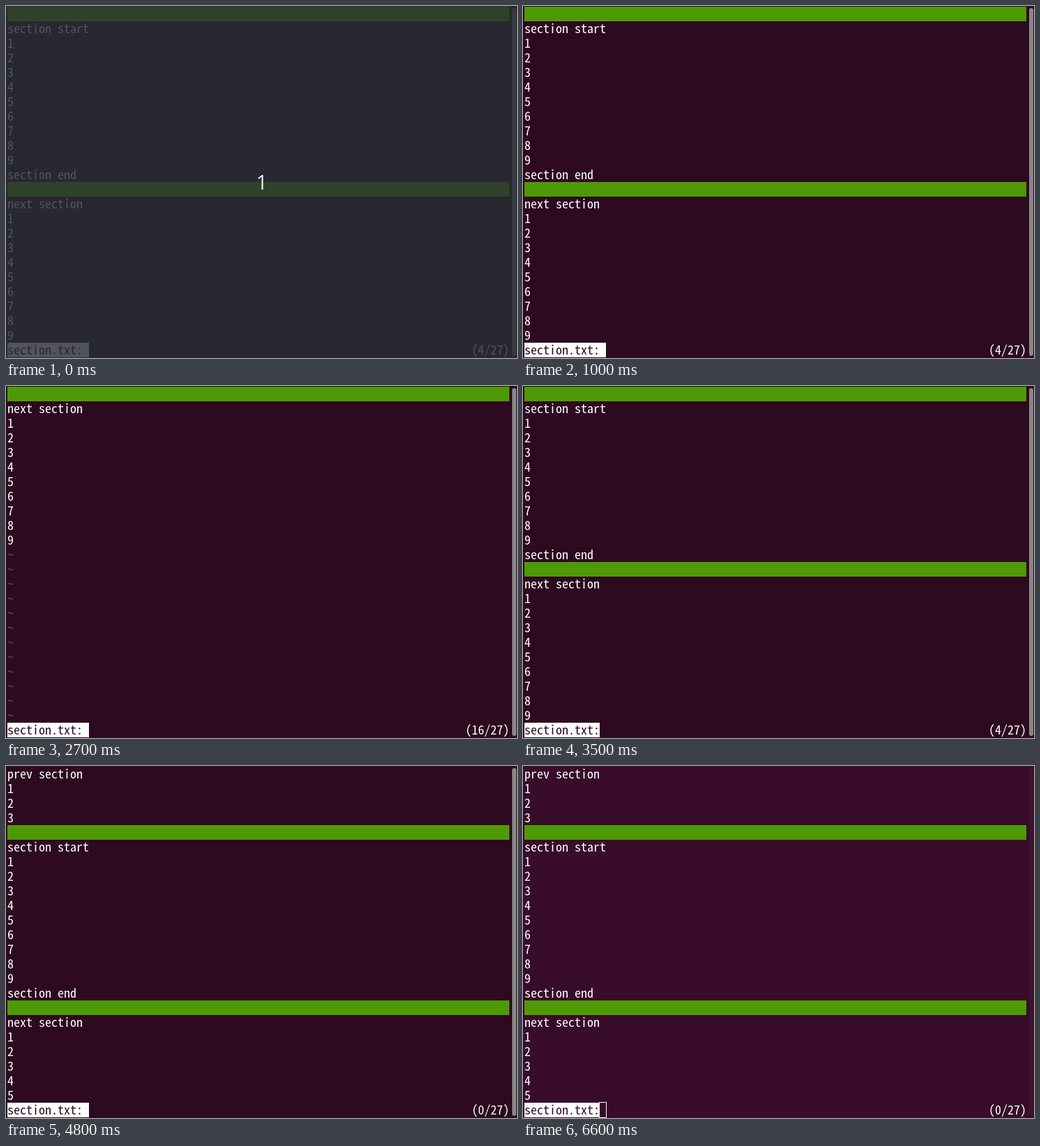
Write an HTML page with a canvas that moves like this. It is 733 px wide and 506 px high and loops after 6.7 s.

```html
<!DOCTYPE html>
<html lang="en">
<head>
<meta charset="utf-8">
<title>Paging through sections</title>
<style>
html, body { margin: 0; height: 100%; overflow: hidden; background: #2d0a20; }
canvas { display: block; }
</style>
</head>
<body>
<canvas id="screen" width="733" height="506"></canvas>
<script>
const ctx = document.getElementById('screen').getContext('2d');
const LOOP = 6700, LEFT = 2, RIGHT = 722, TOP = 1, CELL = 9, ROW = 21, ROWS = 23;
const MONO = '18px "Noto Sans Mono CJK JP", "Noto Sans Mono CJK SC", "Noto Sans Mono", monospace';
const PROMPT = 'section.txt:';

const BAR = null;
const count = n => Array.from({ length: n }, (_, i) => String(i + 1));
const lines = [
  'prev section', ...count(3), BAR,
  'section start', ...count(9), 'section end', BAR,
  'next section', ...count(9)
];

const themes = {
  active:  { bg: '#2d0a20', fg: '#ffffff', bar: '#4e9a06', tilde: '#5f4a5a', scroll: '#8a8686' },
  blurred: { bg: '#380c2a', fg: '#ffffff', bar: '#4e9a06', tilde: '#5f4a5a', scroll: '#3d1430' },
  dimmed:  { bg: '#292730', fg: '#50545b', bar: '#2f4229', tilde: '#3a3842', scroll: '#373a41' }
};

// Each step: start time, first visible line, cursor style, theme
const steps = [
  [0, 4, 'block', 'dimmed'],
  [100, 4, 'block', 'active'],
  [400, 4, 'off', 'active'],
  [1000, 4, 'block', 'active'],
  [1500, 16, 'block', 'active'],
  [2100, 16, 'off', 'active'],
  [2700, 16, 'block', 'active'],
  [3000, 4, 'block', 'active'],
  [3500, 4, 'off', 'active'],
  [3600, 0, 'block', 'active'],
  [4200, 0, 'off', 'active'],
  [4800, 0, 'block', 'active'],
  [5400, 0, 'off', 'active'],
  [6000, 0, 'block', 'active'],
  [6600, 0, 'outline', 'blurred']
];

function rect(x, y, w, h, color) {
  ctx.fillStyle = color;
  ctx.fillRect(x, y, w, h);
}

function text(str, x, row, color, align = 'left') {
  ctx.font = MONO;
  ctx.textAlign = align;
  ctx.fillStyle = color;
  ctx.fillText(str, x, TOP + row * ROW + 17);
}

function drawStatus(first, cursor, c) {
  const y = TOP + ROWS * ROW, end = LEFT + PROMPT.length * CELL;
  rect(LEFT, y, end - LEFT, ROW, c.fg);
  text(PROMPT, LEFT, ROWS, c.bg);
  text(`(${first}/${lines.length})`, RIGHT, ROWS, c.fg, 'right');
  if (cursor === 'block') rect(end, y, CELL, ROW, c.fg);
  if (cursor === 'outline') {
    ctx.strokeStyle = c.fg;
    ctx.lineWidth = 1;
    ctx.strokeRect(end - 0.5, y - 0.5, CELL + 1, ROW + 1);
  }
}

function draw([, first, cursor, theme]) {
  const c = themes[theme];
  rect(0, 0, 733, 506, c.bg);
  for (let row = 0; row < ROWS; row++) {
    const line = lines[first + row];
    if (line === BAR) rect(LEFT, TOP + row * ROW, RIGHT - LEFT, ROW, c.bar);
    else if (line === undefined) text('~', LEFT, row, c.tilde);
    else text(line, LEFT, row, c.fg);
  }
  drawStatus(first, cursor, c);

  ctx.fillStyle = c.scroll;
  ctx.beginPath();
  ctx.roundRect(726, 3, 6, 500, 3);
  ctx.fill();

  if (theme === 'dimmed') {
    ctx.font = '29px "Open Sans", "Noto Sans", sans-serif';
    ctx.textAlign = 'center';
    ctx.fillStyle = '#e8e8e8';
    ctx.fillText('1', 367, 264);
  }
}

function frame(now) {
  const t = now % LOOP;
  draw(steps.findLast(step => step[0] <= t));
  requestAnimationFrame(frame);
}
requestAnimationFrame(frame);
</script>
</body>
</html>
```
